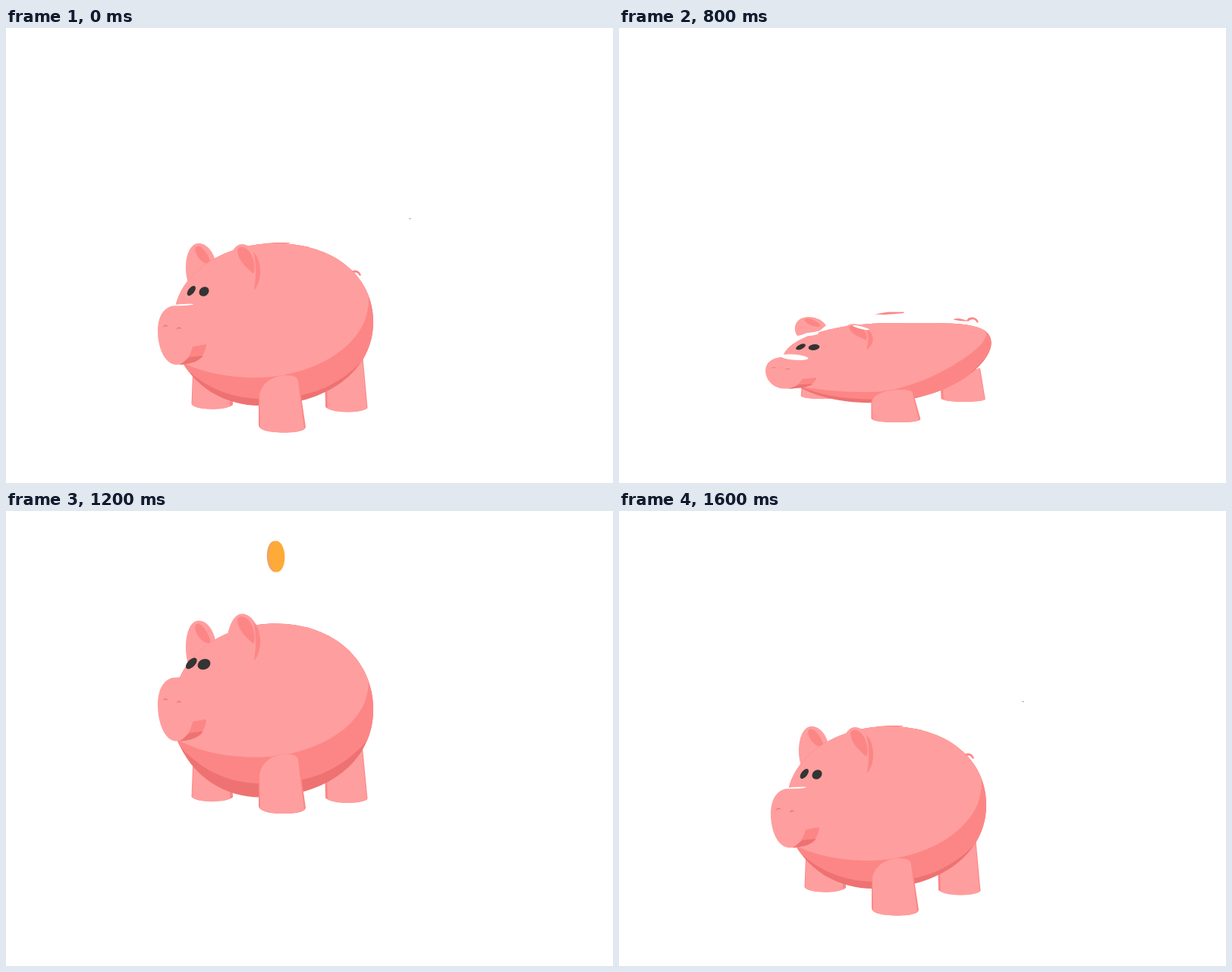
Animation, 800 px wide and 600 px high, one loop 2030 ms. Source, as an HTML page with a canvas:

```html
<!DOCTYPE html>
<html lang="en">
<head>
<meta charset="utf-8">
<title>Piggy bank</title>
<style>
html, body { margin: 0; width: 100%; height: 100%; overflow: hidden; background: #fff; }
canvas { display: block; }
</style>
</head>
<body>
<canvas id="stage" width="800" height="600"></canvas>
<script>
const ctx = document.getElementById('stage').getContext('2d');
const LOOP = 2030, MID_X = 345;
const LIGHT = '#ff9e9e', MID = '#fc8686', DARK = '#ee7272', EYE = '#343434';

// Vertical span [top, bottom] of each part in each pose.
// look: width scale, eye width, shine, height of the body's right tip
const poses = {
  rest:   { body: [284, 498], shade: [284, 489], light: [284, 461], leg: [458, 533],
            legL: [440, 502], legR: [430, 506], earL: [284, 335], earR: [285, 346],
            eyes: [340, 354], snout: [366, 444], slot: [282, 285], tail: [319, 327],
            look: [1, 1, 1, 388] },
  squash: { body: [427, 493], shade: [427, 490], light: [427, 487], leg: [484, 515],
            legL: [460, 484], legR: [455, 488], earL: [416, 431], earR: [428, 452],
            eyes: [444, 450.5], snout: [458, 487], slot: [405, 412], tail: [403, 411],
            look: [1.065, 1.1, 4.5, 318] },
  high:   { body: [129, 369], shade: [129, 350], light: [129, 311], leg: [306, 386],
            legL: [310, 372], legR: [300, 374], earL: [125, 182], earR: [114, 179],
            eyes: [174.5, 192.5], snout: [202, 289], slot: [135, 138], tail: [215, 223],
            look: [1, 1.4, 0, 390] },
  fall:   { body: [148, 377], shade: [148, 359], light: [148, 324], leg: [320, 398],
            legL: [322, 382], legR: [312, 384], earL: [144, 200], earR: [135, 197],
            eyes: [193, 209], snout: [219, 303], slot: [154, 157], tail: [235, 243],
            look: [1, 1.3, 0, 390] },
  land:   { body: [314, 497], shade: [314, 488], light: [314, 464], leg: [467, 530],
            legL: [445, 499], legR: [440, 503], earL: [314, 360], earR: [317, 370],
            eyes: [363, 376], snout: [388, 455], slot: [310, 313], tail: [338, 346],
            look: [1, 1.05, 1.5, 384] }
};

const linear = u => u;
const easeIn = u => u * u;
const easeOut = u => 1 - (1 - u) ** 2;
const easeInOut = u => u < .5 ? 4 * u ** 3 : 1 - 4 * (1 - u) ** 3;

// time, pose, lift, easing towards this step
const steps = [
  [0, 'rest', 0, linear], [670, 'rest', 0, linear],
  [890, 'squash', 0, easeInOut], [920, 'squash', 0, linear],
  [1005, 'high', 0, easeOut], [1090, 'high', 8, easeInOut],
  [1200, 'fall', 0, easeIn], [1335, 'rest', 0, u => .5 * u + .5 * u * u],
  [1370, 'land', 0, easeOut], [1400, 'land', 0, linear],
  [1590, 'rest', 0, easeInOut], [LOOP, 'rest', 0, linear]
];

const paths = {};
const shape = (part, color, d) => (paths[part] ||= []).push([color, new Path2D(d)]);
shape('leg', MID, 'M333 488C333 470 350 458 368 458C380 458 386 461 386 466L395 526C394 532 380 533.5 366 533.5C345 533.5 334 530 333 524Z');
shape('leg', LIGHT, 'M334 486C335 470 350 458 370 458C380 458 385 461 385 466L393 528C386 533 376 533.5 366 533.5C348 533.5 336 530 335 526Z');
shape('legL', MID, 'M247 430L244.5 496C250 504.5 291 504 299 497L298 430Z');
shape('legL', LIGHT, 'M248 430L245.5 497C252 504.5 287 504 295 499V430Z');
shape('legR', MID, 'M470 430L476.5 501C468 508 432 508 421 500L420 460Z');
shape('legR', LIGHT, 'M469 430L475.5 502C467 508 434 508 424 502L423 460Z');
shape('earL', LIGHT, 'M240 336C233 315 238 284 254 284C264 284 273 294 276 308L268 322Z');
shape('earL', MID, 'M249 291C251 284 263 288 270 310C262 314 250 303 249 291Z');
shape('earR', LIGHT, 'M291 318C294 297 302 285 311 285C325 285 336 305 336 325C335 337 331 343 327 346Z');
shape('earR', MID, 'M305 293C306 286 318 287 324 300C328 310 329 318 326 324C318 316 306 308 305 293ZM326 295C337 306 339 332 327 346C328 335 332 320 326 295Z');
shape('snout', MID, 'M246 420L264 417C263 434 250 443 228 444C238 440 243 432 246 420Z');
shape('snout', DARK, 'M242 434L260 432C254 440 244 443 228 444Z');
shape('snout', LIGHT, 'M200 400C200 378 210 366 224 366C232 365 240 365 248 366L262 380V417L246 420C240 438 232 444 225 444C209 444 200 421 200 400Z');
shape('snout', DARK, 'M207 395C208 390 213 391 213 394C210 392 209 393 207 395ZM225 398C225 393 231 394 231 397C228 395 227 396 225 398Z');
shape('slot', MID, 'M337 284.6L354 283H374V283.8L350 284.8Z');
shape('tail', MID, 'M437 322C442 320 448 322 453 324L455 321C461 318 466 320 468 326L466 327C464 322 460 321 455 325C448 325 442 324 437 323Z');

// Body layers, whose right tip moves up as the body flattens
const bodyLayers = tip => ({
  body: [[DARK, new Path2D(`M223 370C230 324 286 284 355 284C432 284 484 ${tip - 61} 484 ${tip}C484 ${tip + 63} 424 498 335 498C290 498 245 475 224 424Z`)]],
  shade: [[MID, new Path2D(`M500 270V${tip + 20}L474 ${tip + 46}C440 472 400 489 340 489C290 489 255 470 226 438L200 270Z`)]],
  light: [[LIGHT, new Path2D(`M474 ${tip - 56}C480 ${tip - 35} 479 ${tip - 18} 472 ${tip}C450 ${tip + 48} 385 461 330 461C290 461 255 454 222 436L200 275H474Z`)]]
});

const mix = (a, b, u) => a + (b - a) * u;

function poseAt(t) {
  const i = Math.max(1, steps.findIndex(s => s[0] > t));
  const [t0, nameA, liftA] = steps[i - 1], [t1, nameB, liftB, ease] = steps[i];
  const u = ease((t - t0) / (t1 - t0)), pose = { lift: mix(liftA, liftB, u) };
  for (const key in poses.rest)
    pose[key] = poses[nameA][key].map((v, k) => mix(v, poses[nameB][key][k], u));
  return pose;
}

function place(pose, part) {
  const [top, bottom] = pose[part], [r0, r1] = poses.rest[part];
  const sx = pose.look[0], sy = (bottom - top) / (r1 - r0);
  ctx.setTransform(sx, 0, 0, sy, MID_X * (1 - sx), top - pose.lift - sy * r0);
}

function draw(pose, part) {
  place(pose, part);
  for (const [color, path] of paths[part]) {
    ctx.fillStyle = color;
    ctx.fill(path);
  }
}

function oval(x, y, rx, ry, color, turn = 0) {
  ctx.fillStyle = color;
  ctx.beginPath();
  ctx.ellipse(x, y, Math.max(0, rx), Math.max(0, ry), turn, 0, 7);
  ctx.fill();
}

const reset = () => ctx.setTransform(1, 0, 0, 1, 0, 0);

function drawCoin(t) {
  if (t < 1100 || t > 1575) return;
  reset();
  const y = 46 + 255 * Math.abs((t - 1302) / 266) ** 3;
  const face = Math.abs(Math.cos((t - 1370) / 500 * Math.PI * 2));
  const rx = Math.max(2, 20 * face), edge = 2 * Math.sqrt(1 - face * face);
  const tilt = -.07 * (1 - face);
  oval(356 - edge, y, rx, 20.5, '#f3a06a', tilt);
  oval(356 + edge / 2, y, rx, 20.5, '#ffaa33', tilt);
  ctx.globalAlpha = .5 * face ** 3;
  oval(356, y, rx - 1, 19.5, '#f2a484', tilt);
  ctx.globalAlpha = 1;
}

// Tiny dashes drifting beside the pig: time, then x, y, length of each dash
const specks = [
  [0, 532, 251, 1, 532, 251, 1, 532, 251, 1],
  [30, 532, 251, 1, 532, 251, 1, 532, 251, 1],
  [530, 565, 108, 5, 570, 116, 7, 596, 153, 8],
  [730, 565, 108, 5, 570, 116, 7, 596, 153, 8],
  [970, 525, 214, 5, 540, 215, 3, 573, 228, 3],
  [1070, 525, 214, 5, 540, 215, 3, 573, 228, 3]
];
const speckGaps = [[730, 970], [1070, 1600]];

function drawSpecks(t) {
  if (speckGaps.some(([from, to]) => t >= from && t < to)) return;
  if (t >= 1600) t = 0;
  reset();
  const i = specks.findIndex(s => s[0] > t), a = specks[i - 1], b = specks[i];
  const u = (t - a[0]) / (b[0] - a[0]), at = k => Math.round(mix(a[k], b[k], u));
  ctx.fillStyle = '#444';
  for (let k = 1; k < a.length; k += 3)
    for (let d = 0; d < at(k + 2); d += 2)
      ctx.fillRect(at(k) + d, at(k + 1) + (d > 3 ? 1 : 0), 1, 1);
}

function drawEye(pose, x, y, rx, ry, turn) {
  place(pose, 'eyes');
  ctx.translate(x, y);
  ctx.scale(pose.look[1], 1);
  oval(0, 0, rx, ry, EYE, turn);
}

// White shine above the snout and, when squashed, inside the ears
function drawShine(pose) {
  const g = pose.look[2], dy = pose.lift, open = Math.max(0, g - 1.5);
  reset();
  if (g > 0) oval(235 - g, pose.snout[0] - dy + (g > 2 ? .5 : -1), 11 + 2 * g, g, '#fff', g > 2 ? .08 : -.06);
  if (open > 0) {
    oval(253, pose.earL[1] - 2, 5 * open, open, '#fff', -.1);
    oval(319, pose.earR[0] + 5, 5.5 * open, .8 * open, '#fff', .24);
  }
}

function render(t) {
  reset();
  ctx.fillStyle = '#fff';
  ctx.fillRect(0, 0, 800, 600);
  const pose = poseAt(t);
  Object.assign(paths, bodyLayers(pose.look[3]));
  drawSpecks(t);
  for (const part of ['tail', 'slot']) draw(pose, part);
  drawCoin(t);
  for (const part of ['legL', 'legR', 'earL', 'body']) draw(pose, part);
  ctx.save();
  place(pose, 'body');
  ctx.clip(paths.body[0][1]);
  for (const part of ['shade', 'light']) draw(pose, part);
  ctx.restore();
  for (const part of ['leg', 'earR', 'snout']) draw(pose, part);
  drawShine(pose);
  drawEye(pose, 244.3, 346.5, 7.6, 4, -.9);
  drawEye(pose, 261, 347.5, 7, 5.8, -.7);
}

const start = performance.now();
function tick() {
  render((performance.now() - start) % LOOP);
  requestAnimationFrame(tick);
}
tick();
</script>
</body>
</html>
```
